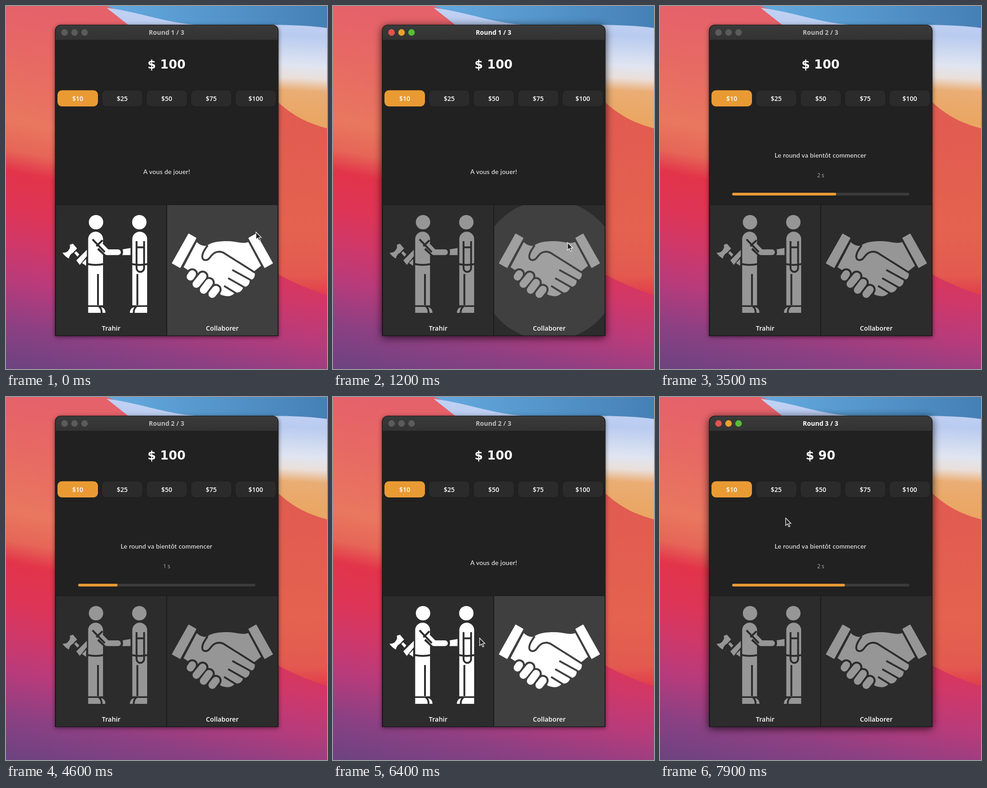
An HTML page that plays this animation: 705x795 px, repeating every 8000 ms.

```html
<!DOCTYPE html>
<html lang="fr">
<head>
<meta charset="utf-8">
<title>Trahir ou collaborer</title>
<style>
  html, body { margin: 0; width: 100%; height: 100%; overflow: hidden; background: #222; }
  svg { display: block; width: 705px; height: 795px; }
  text { text-anchor: middle; fill: #fff; font: 600 14px "Open Sans", sans-serif; }
  .title { font-weight: 700; }
  .label { font-size: 14.3px; }
  .money { font: bold 26.67px "DejaVu Sans", sans-serif; }
  .note { font: 14px Lato, sans-serif; letter-spacing: .25px; }
  .secs { font-weight: 400; font-size: 12px; fill: #b4b4b4; }
  .frame { filter: drop-shadow(0 2px 5px rgba(0,0,0,.5)); }
  .focus .frame { filter: drop-shadow(0 3px 9px rgba(0,0,0,.75)); }
  .dot { fill: #5b5b5b; }
  .focus .dot { fill: var(--c); }
  .title { fill: #bdbdbd; }
  .focus .title { fill: #fff; }
  mask .on { fill: #fff; }
  mask .cut { fill: none; stroke: #000; stroke-width: 4; stroke-linejoin: round; }
  mask .limb { fill: none; stroke: #fff; stroke-linecap: round; stroke-linejoin: round; }
</style>
</head>
<body>
<svg id="stage" viewBox="0 0 705 795">
  <defs>
    <linearGradient id="sky" gradientUnits="userSpaceOnUse" x1="0" y1="0" x2="-154" y2="769">
      <stop offset="0" stop-color="#e5626a"/>
      <stop offset=".15" stop-color="#e76a63"/>
      <stop offset=".31" stop-color="#e9775f"/>
      <stop offset=".39" stop-color="#e66657"/>
      <stop offset=".45" stop-color="#e2344a"/>
      <stop offset=".55" stop-color="#de3556"/>
      <stop offset=".65" stop-color="#cf3869"/>
      <stop offset=".75" stop-color="#b83b7b"/>
      <stop offset=".87" stop-color="#8c4083"/>
      <stop offset="1" stop-color="#6a4380"/>
    </linearGradient>
    <linearGradient id="blue">
      <stop offset="0" stop-color="#64aae0"/>
      <stop offset="1" stop-color="#4580b5"/>
    </linearGradient>
    <linearGradient id="pale" gradientUnits="userSpaceOnUse" x1="650" y1="20" x2="637" y2="250">
      <stop offset="0" stop-color="#c3d3f4"/>
      <stop offset=".2" stop-color="#b9cbf0"/>
      <stop offset=".48" stop-color="#e0e5f1"/>
      <stop offset=".6" stop-color="#eadfda"/>
      <stop offset=".72" stop-color="#eaad74"/>
      <stop offset="1" stop-color="#eaa662"/>
    </linearGradient>
    <linearGradient id="coral" gradientUnits="userSpaceOnUse" x1="650" y1="220" x2="650" y2="630">
      <stop offset="0" stop-color="#e15b51"/>
      <stop offset=".65" stop-color="#e4624f"/>
      <stop offset=".9" stop-color="#e35a50"/>
      <stop offset="1" stop-color="#e13f4c"/>
    </linearGradient>
    <linearGradient id="bar" x2="0" y2="1">
      <stop offset="0" stop-color="#3a3a3a"/>
      <stop offset="1" stop-color="#333"/>
    </linearGradient>
    <clipPath id="clipL"><rect x="110" y="436" width="242" height="285.500"/></clipPath>
    <clipPath id="clipR"><rect x="354" y="436" width="242.500" height="285.500"/></clipPath>

    <mask id="iconL" maskUnits="userSpaceOnUse" x="110" y="436" width="242" height="286">
      <g id="person">
        <circle class="on" cx="197.700" cy="473.500" r="15.800"/>
        <path class="on" d="M180.500 655.500V510.500a16.300 16.300 0 0 1 32.600 0V655.500zM180.500 659H206q12 1 12.500 13H180.500z"/>
        <path class="cut" stroke-width="3.500" d="M179 565q18 4 36 0M202 655V587M204 658q6 4 6 14"/>
      </g>
      <use href="#person" transform="matrix(-1 0 0 1 490.500 0)"/>
      <path class="cut" style="stroke-width:20" d="M207 526L222 539.500H247"/>
      <path class="limb" stroke-width="12.500" d="M203 520L222 539.300H246"/>
      <path class="cut" d="M190 511L217 539M198.500 526L212 513"/>
      <path class="on" d="M256 533L273.500 530V545.500H255.500q3-6 .5-12.500z"/>
      <path class="cut" d="M286.700 515V574a8.300 8.300 0 0 0 16.600 0V515M286.700 528.500H303"/>
      <path class="on" d="M147 520.500L156 531L147 540.500Q140 544 138 553Q130 549 124 540.500Q134 541 138 534Q142 529 140 523zM150 541L154 537L161 544L157 549zM154.500 557L177.500 534V548L162 567zM167 563L176 554V569z"/>
    </mask>

    <mask id="iconR" maskUnits="userSpaceOnUse" x="354" y="436" width="243" height="286">
      <path class="on" stroke="#fff" stroke-width="3" stroke-linejoin="round" d="M401.500 500L416.500 508.500L382 572L366 563zM549 500L534 508.500L568.500 572L584.500 563z"/>
      <path class="on" d="M419 517C426 524 434 526 441 525C452 517 466 515 487 515C506 515 517 522 532 517L560 569L545 581C549 590 545 600 535 600C536 609 530 616 521 615C519 625 511 629 503 627C495 638 484 637 471 632L470 625L390 572z"/>
      <path class="cut" d="M443 524C436 534 431 541 431 549C431 557 440 559 446 553C452 546 456 538 470 538L477 540L547 584M497 578L538 600.500M488 596L524 616.500M479 613L505 629"/>
      <g id="fingers"></g>
    </mask>
  </defs>

  <rect width="705" height="795" fill="url(#sky)"/>
  <path fill="url(#blue)" d="M220 0H705V60H400z"/>
  <path fill="url(#pale)" d="M221 4C300 14 350 38 430 42C560 40 650 40 705 48V270H500V200L268 41z"/>
  <path fill="url(#coral)" d="M500 130C580 170 590 238 705 268V633Q650 616 598 588L500 540z"/>

  <g id="win">
    <path class="frame" fill="#171717" d="M107.500 723V54a13 13 0 0 1 13-13H585.500a13 13 0 0 1 13 13V723z"/>
    <path fill="url(#bar)" d="M109 74V54a12 12 0 0 1 12-12H585a12 12 0 0 1 12 12V74z"/>
    <rect x="109" y="74" width="488.500" height="648" fill="#212121"/>
    <circle class="dot" style="--c:#e2544c" cx="128.500" cy="58" r="7.200"/>
    <circle class="dot" style="--c:#eaa12b" cx="150.500" cy="58" r="7.200"/>
    <circle class="dot" style="--c:#56bd36" cx="172.500" cy="58" r="7.200"/>
    <text class="title" id="title" x="352.500" y="63"></text>
    <text class="money" id="money" x="352.500" y="137"></text>
    <g id="bets"></g>

    <text class="note" id="play" x="353" y="368">A vous de jouer!</text>
    <g id="wait">
      <text class="note" x="352.500" y="332">Le round va bientôt commencer</text>
      <text class="secs" id="secs" x="353" y="375"></text>
      <rect x="158.500" y="409" width="389" height="6" rx="3" fill="#3b3b3b"/>
      <rect id="fill" x="158.500" y="409" height="6" rx="3" fill="#e99a33"/>
    </g>

    <rect x="109" y="435" width="488" height="287" fill="#1b1b1b"/>
    <g clip-path="url(#clipL)">
      <rect id="panelL" x="110" y="436" width="243" height="286"/>
      <circle id="rippleL" cx="231" cy="578.500" fill="#fff"/>
      <rect class="icon" x="110" y="436" width="243" height="286" fill="#fff" mask="url(#iconL)"/>
    </g>
    <g clip-path="url(#clipR)">
      <rect id="panelR" x="354" y="436" width="243" height="286"/>
      <circle id="rippleR" cx="475" cy="578.500" fill="#fff"/>
      <rect class="icon" x="354" y="436" width="243" height="286" fill="#fff" mask="url(#iconR)"/>
    </g>
    <text class="label" x="231" y="711">Trahir</text>
    <text class="label" x="475" y="711">Collaborer</text>
  </g>

  <path id="cursor" fill="#222" stroke="#fff" stroke-width="1.200" d="M0 0V16.500L4 13L6.800 19.300L9.400 18.100L6.700 12H11.800z"/>
</svg>

<script>
const LOOP = 8000, STEP = 100;
const $ = id => document.getElementById(id);
const icons = document.querySelectorAll('.icon');

// Rows are [time, ...values]
const BAR = [
  [[2200, 540], [2400, 514], [2800, 514], [2900, 456], [3000, 443], [3100, 443],
   [3200, 426], [4000, 322], [4600, 245], [5200, 167]],
  [[6900, 536], [7900, 406]]
];
const MOUSE = [
  [[0, 549, 495], [100, 547, 485], [200, 540, 492], [300, 530, 505], [400, 519, 516],
   [500, 512, 521], [600, 515, 518], [1500, 515, 518], [1600, 560, 516], [1700, 650, 512]],
  [[6300, 505, 522], [6400, 322, 528], [6500, 215, 530], [6600, 195, 529], [7300, 195, 529],
   [7600, 194, 692], [7700, 205, 600], [7800, 245, 400], [7900, 276, 265]]
];

const within = (t, a, b) => t >= a && t < b;
const show = (el, on) => el.setAttribute('visibility', on ? 'visible' : 'hidden');

// Values at time t, or null outside every track
function sample(tracks, t) {
  const rows = tracks.find(r => t >= r[0][0] && t <= r[r.length - 1][0]);
  if (!rows) return null;
  const i = Math.max(1, rows.findIndex(r => r[0] >= t));
  const a = rows[i - 1], b = rows[i], k = (t - a[0]) / (b[0] - a[0]);
  return a.slice(1).map((v, j) => v + (b[j + 1] - v) * k);
}

$('bets').innerHTML = [10, 25, 50, 75, 100].map((n, i) => {
  const x = 113 + i * 97.75;
  return `<rect x="${x - .5}" y="184" width="90" height="36.500" rx="10.500"
    fill="${i ? '#2b2b2b' : '#e99a33'}" stroke="#1b1b1b"/>
    <text x="${x + 44.5}" y="207.500">$${n}</text>`;
}).join('');

const fingers = 'M405 593L409 587M418 609L432 592M434 622L446 606M453 631L461 621';
$('fingers').innerHTML =
  `<path class="limb" style="stroke:#000" stroke-width="25" d="${fingers}"/>
   <path class="limb" stroke-width="16.500" d="${fingers}"/>`;

function ripple(el, age) {
  const on = age >= 0 && age < 600;
  show(el, on);
  if (!on) return;
  el.setAttribute('r', 103.5 + age * .505);
  el.setAttribute('opacity', .115 - age * .0002);
}

function draw(t) {
  const round = t < 2200 ? 1 : t < 6900 ? 2 : 3;
  const bar = sample(BAR, t), mouse = sample(MOUSE, t);
  const ready = t < 1200 || within(t, 5300, 6900);
  const hoverR = t < 1200 || within(t, 6300, 6500);
  const hoverL = within(t, 6500, 6900);

  $('win').setAttribute('class', within(t, 1100, 2000) || t >= 6800 ? 'focus' : '');
  $('title').textContent = `Round ${round} / 3`;
  $('money').textContent = round < 3 ? '$ 100' : '$ 90';

  show($('play'), !bar);
  show($('wait'), bar);
  if (bar) {
    const width = bar[0] - 158.5;
    $('fill').setAttribute('width', width);
    $('secs').textContent = Math.ceil(width / 129.5) + ' s';
  }

  $('panelL').setAttribute('fill', hoverL ? '#3f3f3f' : '#2c2c2c');
  $('panelR').setAttribute('fill', hoverR ? '#3f3f3f' : '#2c2c2c');
  icons.forEach(el => el.setAttribute('opacity', ready ? 1 : .5));
  ripple($('rippleR'), t - 1100);
  ripple($('rippleL'), t - 6800);

  show($('cursor'), mouse);
  if (mouse) $('cursor').setAttribute('transform', `translate(${mouse})`);
}

const start = performance.now();
function tick() {
  const t = (performance.now() - start) % LOOP;
  draw(Math.floor(t / STEP) * STEP);
  requestAnimationFrame(tick);
}
tick();
</script>
</body>
</html>
```
